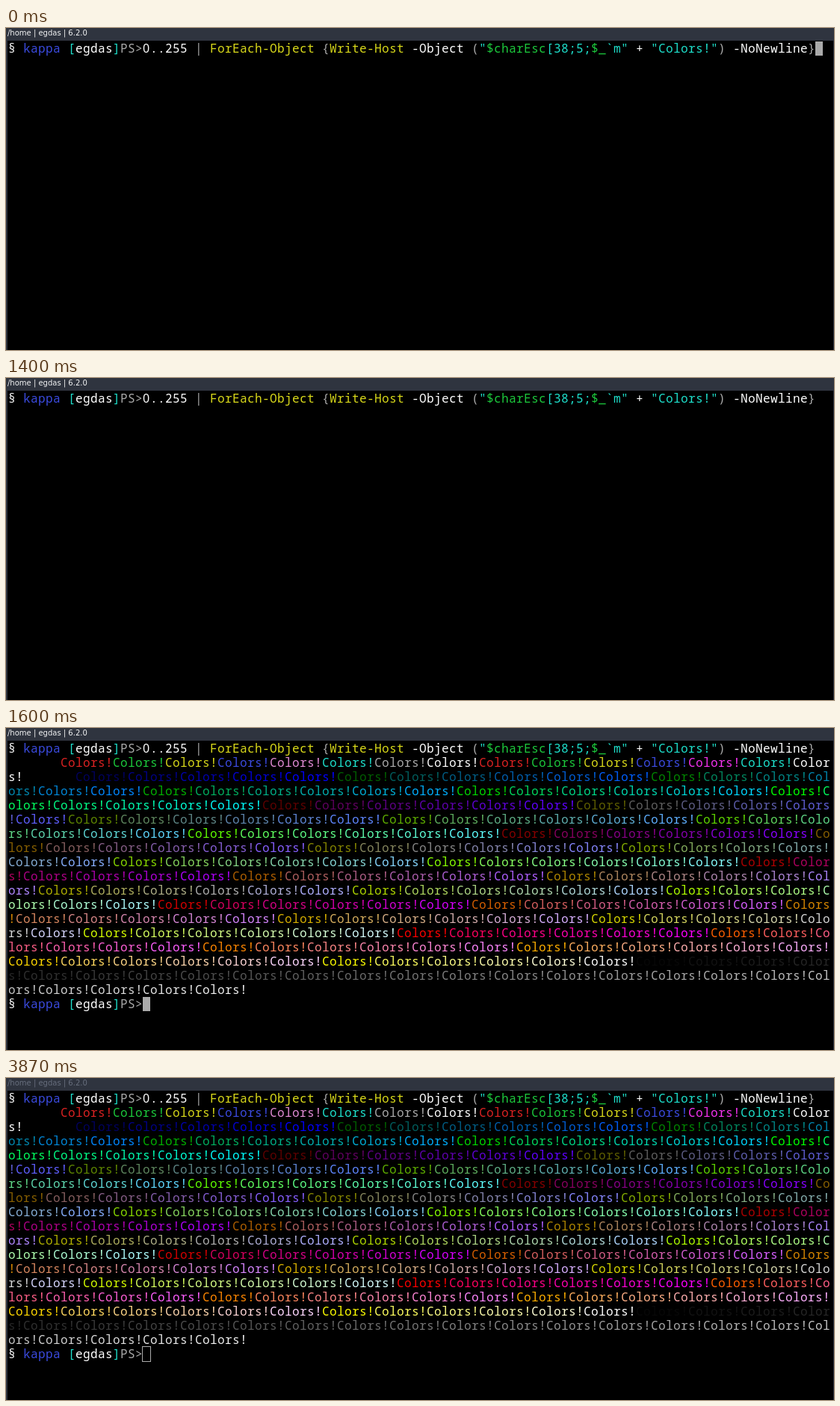
These frames come from a looping animation (1108 by 431 pixels, 4410 ms). An HTML page:

```html
<!DOCTYPE html>
<html lang="en">
<head>
<meta charset="utf-8">
<title>Terminal colors</title>
<style>
html, body { margin: 0; width: 100%; height: 100%; overflow: hidden; background: #000; }
#win {
  position: absolute; left: 0; top: 0; width: 1108px; height: 431px;
  overflow: hidden; background: #000;
}
#win::after {
  content: ""; position: absolute; inset: 17px 0 0 0;
  border: solid #2f343f; border-width: 0 1px 0 2px;
}
#bar {
  position: absolute; left: 0; top: 0; width: 100%; height: 17px;
  padding-left: 2px; box-sizing: border-box; background: #2f343f;
  font: 10px/14px "DejaVu Sans", sans-serif; white-space: pre;
}
#term {
  position: absolute; left: 3px; top: 18px;
  font: 16px/19px "Noto Sans Mono", monospace; white-space: pre;
  font-variant-ligatures: none;
}
#term span { position: absolute; }
#term .zero { font-family: "Noto Sans", sans-serif; }
#cursor { position: absolute; left: 0; top: 0; width: 10px; height: 19px; }

#bar, #early, #late, #cursor { animation: 4410ms step-end infinite; }
#bar { animation-name: focus; }
#early { animation-name: early; }
#late { animation-name: late; }
#cursor { animation-name: cursor; }

@keyframes focus {
  0% { color: #f3f4f5; }
  87.7551%, 100% { color: #676e7d; }
}
@keyframes early {
  0% { visibility: hidden; }
  34.6939%, 100% { visibility: visible; }
}
@keyframes late {
  0% { visibility: hidden; }
  36.2812%, 100% { visibility: visible; }
}
@keyframes cursor {
  0%       { transform: translate(1080px, 0); background: #aaa; box-shadow: none; }
  11.3379% { transform: translate(1080px, 0); background: transparent; box-shadow: none; }
  18.1406% { transform: translate(1080px, 0); background: #aaa; box-shadow: none; }
  31.7460% { transform: translate(1080px, 0); background: transparent; box-shadow: none; }
  34.0136% { transform: translate(1080px, 0); background: #aaa; box-shadow: none; }
  34.6939% { transform: translate(30px, 114px); background: #aaa; box-shadow: none; }
  36.2812% { transform: translate(180px, 342px); background: #aaa; box-shadow: none; }
  56.6893% { transform: translate(180px, 342px); background: transparent; box-shadow: none; }
  61.9048% { transform: translate(180px, 342px); background: #aaa; box-shadow: none; }
  79.3651% { transform: translate(180px, 342px); background: transparent; box-shadow: none; }
  87.7551%, 100% { transform: translate(180px, 342px); background: transparent; box-shadow: 0 0 0 1px #aaa; }
}
</style>
</head>
<body>
<div id="win">
  <div id="bar">/home | egdas | 6.2.0</div>
  <div id="term">
    <div id="typed"></div>
    <div id="early"></div>
    <div id="late"></div>
    <div id="cursor"></div>
  </div>
</div>
<script>
const COLS = 110, CELL = 10, LINE = 19;
const WORD = "Colors!";
const $ = id => document.getElementById(id);

const base = [
  "#000000", "#dc2222", "#1cc83c", "#d9d91a", "#3b4be0", "#e28bd5", "#1ee0cc", "#aaaaaa",
  "#ffffff", "#dc2222", "#1cc83c", "#d9d91a", "#3b4be0", "#f532f0", "#1ee0cc", "#ffffff"
];
const [, , green, yellow, blue, , cyan, gray, white] = base;

// xterm palette: 16 base colors, 6x6x6 cube, 24 grays
function ansi(n) {
  if (n < 16) return base[n];
  if (n > 231) {
    const v = 8 + 10 * (n - 232);
    return `rgb(${v},${v},${v})`;
  }
  const level = k => k ? 55 + 40 * k : 0;
  const i = n - 16;
  return `rgb(${level(Math.floor(i / 36))},${level(Math.floor(i / 6) % 6)},${level(i % 6)})`;
}

function put(parent, text, color, col, row) {
  const s = document.createElement("span");
  s.textContent = text;
  s.style.cssText = `color:${color};left:${col * CELL}px;top:${row * LINE}px`;
  if (text === "0") s.className = "zero";
  parent.append(s);
  return s;
}

function line(parent, parts, row) {
  let col = 0;
  for (const [text, color] of parts) {
    put(parent, text, color, col, row);
    col += text.length;
  }
}

// Fit the font's advance to the terminal cell
const probe = put($("term"), "m".repeat(100), white, 0, 0);
const advance = probe.getBoundingClientRect().width / 100;
probe.remove();
$("term").style.letterSpacing = `${CELL - advance}px`;

const prompt = [["§ ", white], ["kappa ", blue], ["[", cyan], ["egdas", white], ["]", cyan], ["PS>", gray]];
const command = [
  ["0", white], ["..255 ", white], ["| ", gray], ["ForEach-Object ", yellow], ["{", gray],
  ["Write-Host ", yellow], ["-Object ", white], ["(", gray], ['"', cyan], ["$charEsc", green],
  ["[38;5;", cyan], ["$_", green], ['`m" ', cyan], ["+ ", white], ['"Colors!"', cyan],
  [") ", gray], ["-NoNewline", white], ["}", gray]
];

line($("typed"), [...prompt, ...command], 0);

for (let n = 0; n < 256; n++) {
  const parent = $(n < 79 ? "early" : "late");
  const at = n * WORD.length;
  const col = at % COLS, row = 1 + Math.floor(at / COLS);
  const fit = COLS - col;
  put(parent, WORD.slice(0, fit), ansi(n), col, row);
  if (fit < WORD.length) put(parent, WORD.slice(fit), ansi(n), 0, row + 1);
}

line($("late"), prompt, 18);
</script>
</body>
</html>
```
